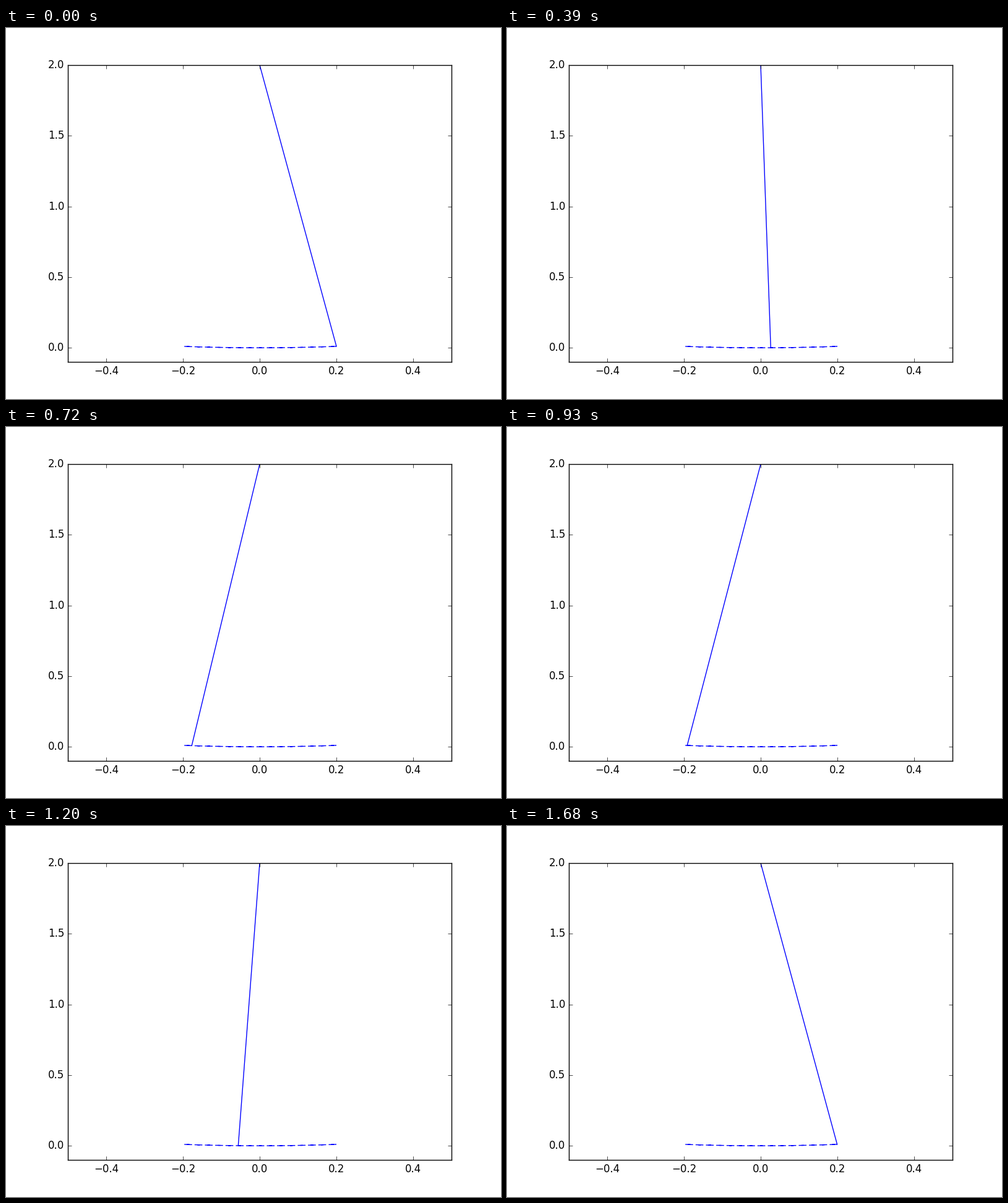
A matplotlib script for the animation above (1.71 s loop, 800 px wide and 600 px high).

```python
import numpy as np
import matplotlib.pyplot as plt
from matplotlib.animation import FuncAnimation

plt.style.use("classic")
plt.rcParams["font.family"] = "DejaVu Sans"

LENGTH = 2.0
GRAVITY = 9.81
START_X = 0.2
DT = 0.05
FRAMES = 57
INTERVAL = 30

omega = np.sqrt(GRAVITY / LENGTH)
amplitude = np.arcsin(START_X / LENGTH)


def bob(t):
    """Position of the pendulum's end in the small-angle solution."""
    theta = amplitude * np.cos(omega * t)
    return LENGTH * np.sin(theta), LENGTH * (1 - np.cos(theta))


fig = plt.figure(figsize=(8, 6), dpi=100, facecolor="white")
ax = fig.add_axes([0.125, 0.1, 0.775, 0.8])
ax.set_xlim(-0.5, 0.5)
ax.set_ylim(-0.1, 2.0)
ax.set_xticks([-0.4, -0.2, 0.0, 0.2, 0.4])
ax.set_yticks([0.0, 0.5, 1.0, 1.5, 2.0])

# The path runs there and back, so its dashes overlap.
ax.plot(*bob(DT * np.arange(FRAMES)), "b--")
rod, = ax.plot([], [], "b-")


def update(i):
    x, y = bob(DT * i)
    rod.set_data([0, x], [LENGTH, y])
    return rod,


anim = FuncAnimation(fig, update, frames=FRAMES, interval=INTERVAL,
                     repeat=True, repeat_delay=0, blit=False)
plt.show()
```
